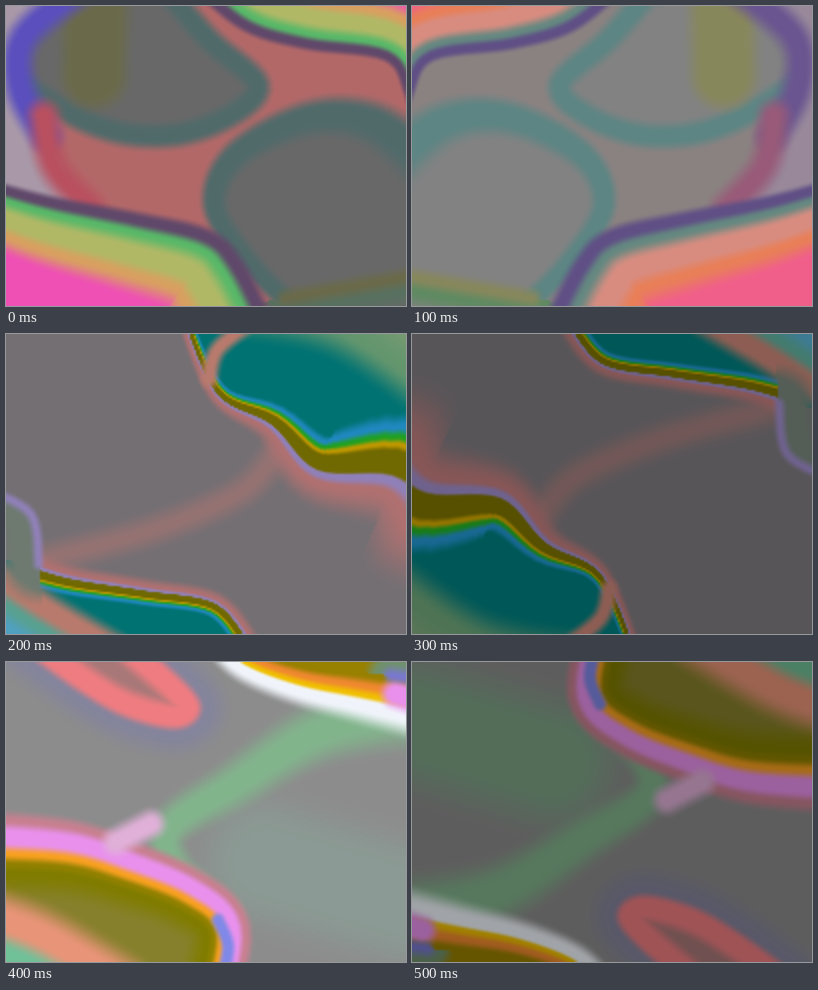
These frames come from a looping animation (400 px wide and 300 px high, 0.6 s). An HTML page with a canvas:

```html
<!DOCTYPE html>
<html lang="en">
<head>
<meta charset="utf-8">
<title>Liquid colour</title>
<style>
html, body { margin: 0; width: 100%; height: 100%; overflow: hidden; background: #686868; }
canvas { display: block; width: 400px; height: 300px; }
</style>
</head>
<body>
<canvas id="stage" width="400" height="300"></canvas>
<script>
const W = 400, H = 300, HOLD = 100;
const GRAIN = 2;   // stage pixels per computed sample
const STEPS = 7;   // straight pieces per curve span

const clear = color => color + '00';
const mix = (a, b, t) => a + (b - a) * t;
const smooth = t => t * t * (3 - 2 * t);

// A fold is a curve through key points and a colour ramp across it.
// Offsets count to the right of travel; spread scales them from start to end.
const fold = (keys, ramp, spread = [1, 1]) => ({ line: curve(keys), ramp, spread });

// A soft band, solid within core and gone at fade
const band = (keys, color, core, fade) => fold(keys, [
  [-fade, clear(color)], [-core, color], [core, color], [fade, clear(color)]
]);

// Catmull-Rom curve as a polyline
function curve(keys) {
  const n = keys.split(' ').map(Number), last = n.length / 2 - 1, line = [];
  const at = (i, axis) => n[2 * Math.max(0, Math.min(last, i)) + axis];
  for (let k = 0; k <= last * STEPS; k++) {
    const i = Math.min(last - 1, Math.floor(k / STEPS)), u = k / STEPS - i;
    line.push([0, 1].map(axis => {
      const [a, b, c, d] = [-1, 0, 1, 2].map(j => at(i + j, axis));
      return b + u / 2 * (c - a + u * (2 * a - 5 * b + 4 * c - d + u * (3 * (b - c) + d - a)));
    }));
  }
  return line;
}

const dusk = {
  base: '#b36868', gray: '#686868', teal: '#506a6a', olive: '#6a6a4a', moss: '#587060',
  haze: '#a898a8', blue: '#5a4fbd', red: '#b8505f', rim: '#60486a',
  green: '#58b868', lime: '#b0b866', amber: '#d8a060', pink: '#ee50b4'
};
const dawn = {
  base: '#8a8281', gray: '#828282', teal: '#5c8583', olive: '#87875c', moss: '#5f8a62',
  haze: '#98889a', blue: '#6a5590', red: '#985a78', rim: '#5f4f85',
  green: '#648880', lime: '#d88c80', amber: '#e87f58', pink: '#f05f8a'
};

function waves(p) {
  const glow = [
    [-8, clear(p.rim)], [-1, p.rim], [2, p.rim], [9, p.green],
    [20, p.lime], [28, p.lime], [38, p.amber], [54, p.pink]
  ];
  return {
    base: p.base,
    folds: [
      fold('160 -20 205 32 254 78 225 112 160 132 80 118 -30 50',
        [[-16, clear(p.teal)], [-2, p.teal], [6, p.teal], [20, p.gray]]),
      fold('430 150 370 108 300 105 225 145 203 200 240 260 290 310',
        [[-20, p.gray], [-8, p.teal], [0, p.teal], [10, clear(p.teal)]], [2.4, 1]),
      band('90 -20 88 70', p.olive, 20, 42),
      fold('280 292 420 268',
        [[-14, clear(p.olive)], [0, p.olive], [14, p.moss], [34, clear(p.moss)]]),
      fold('80 -20 20 30 15 80 40 130',
        [[-24, clear(p.blue)], [-3, p.blue], [6, p.blue], [24, p.haze]]),
      band('38 110 48 160 85 202', p.red, 3, 24),
      fold('-30 175 40 195 130 213 200 230 230 258 262 320', glow, [1, 1.7]),
      fold('410 130 402 85 380 50 300 38 240 20 190 -20', glow, [0.8, 1.2])
    ]
  };
}

function fins() {
  const pink = '#b07070', purple = '#9080b8', olive = '#706800', teal = '#007272';
  const corner = '#64966e', salmon = '#b87a6c', leaf = '#6e7a70', ridge = '#957272';
  const fin = [
    [-42, clear(pink)], [-9, pink], [-2, purple], [1, purple], [4, olive], [19, olive],
    [24, '#c09800'], [29, '#20a020'], [36, '#2088c0'], [48, teal]
  ];
  return {
    base: '#736f73',
    folds: [
      band('270 120 235 158 150 195 40 225', ridge, 0, 24),
      fold('420 175 385 145 310 138 265 92 210 60 175 -20', fin, [2.2, 0.2]),
      fold('240 -5 330 15 430 85', [[-60, '#7a9a72'], [-20, corner], [16, clear(corner)]]),
      band('250 -15 212 15 203 45', salmon, 2, 13),
      fold('33 235 70 245 140 256 210 269 245 310', fin, [0.45, 0.33]),
      fold('-10 235 45 272 110 310',
        [[-18, clear(salmon)], [0, salmon], [10, salmon], [24, '#58a090'], [42, '#50a0c0']]),
      fold('-20 155 25 180 33 230',
        [[-8, clear(purple)], [0, purple], [9, leaf], [20, leaf], [45, clear(leaf)]])
    ]
  };
}

function ribbons({ mist }) {
  const green = '#82b48c', violet = '#84849c', red = '#ee7c80', rose = '#c88090';
  const orchid = '#e890ec', white = '#f0f4fa', salmon = '#e89478', sky = '#7878d0';
  return {
    base: '#8c8c8c',
    folds: [
      band('260 200 400 240', mist, 25, 85),
      fold('390 50 310 72 230 122 165 165 170 205 220 250',
        [[-38, clear(green)], [-7, green], [7, green], [38, clear(green)]], [1.3, 0.6]),
      fold('20 -20 75 20 120 46 168 58 186 46 168 22 125 -15', [
        [-24, '#a87878'], [-10, red], [3, red], [14, violet], [45, clear(violet)]
      ]),
      fold('420 60 350 44 290 30 235 8 205 -20', [
        [-24, clear(white)], [-2, white], [7, white], [13, '#f0c000'],
        [24, '#f08830'], [36, '#988000']
      ], [1.1, 0.6]),
      band('390 32 430 45', orchid, 6, 20),
      fold('430 20 385 14', [[-10, clear(sky)], [0, sky], [14, '#70906c'], [30, clear('#70906c')]]),
      fold('-30 190 60 195 120 212 180 236 215 268 205 330', [
        [-48, clear(rose)], [-34, rose], [-22, orchid], [-11, orchid], [1, '#f8a020'],
        [12, '#908000'], [20, '#807c00'], [55, '#86802c']
      ], [1, 0.7]),
      band('110 180 145 162', '#e0b0d8', 4, 20),
      band('212 258 222 285 215 320', '#8088e8', 2, 10),
      fold('-20 245 40 268 120 315',
        [[-30, clear(salmon)], [0, salmon], [14, salmon], [34, '#70c098']])
    ]
  };
}

const day = { mist: '#8b9a94' }, night = { mist: '#7da486' };

// Each pose: scene, horizontal and vertical flip, brightness
const poses = [
  [waves(dusk), 1, 1, 1],
  [waves(dawn), -1, 1, 1],
  [fins(), 1, 1, 1],
  [fins(), -1, -1, 0.77],
  [ribbons(day), 1, 1, 1],
  [ribbons(night), -1, -1, 0.67]
];

function rgba(hex) {
  const part = i => parseInt(hex.slice(i, i + 2), 16);
  return [part(1), part(3), part(5), hex.length > 7 ? part(7) / 255 : 1];
}

// Signed offset from the fold's curve, with spread taken out
function offset({ line, spread }, x, y) {
  let best = Infinity, side = 1, place = 0;
  for (let i = 0; i < line.length - 1; i++) {
    const [ax, ay] = line[i], dx = line[i + 1][0] - ax, dy = line[i + 1][1] - ay;
    const px = x - ax, py = y - ay;
    const u = Math.max(0, Math.min(1, (px * dx + py * dy) / (dx * dx + dy * dy)));
    const dist = (px - u * dx) ** 2 + (py - u * dy) ** 2;
    if (dist < best) {
      best = dist;
      side = dx * py - dy * px < 0 ? -1 : 1;
      place = (i + u) / (line.length - 1);
    }
  }
  return side * Math.sqrt(best) / mix(spread[1], spread[0], (1 - place) ** 2);
}

function shade(stops, d) {
  const i = stops.findIndex(stop => stop[0] > d);
  if (i === 0) return stops[0][1];
  if (i < 0) return stops[stops.length - 1][1];
  const [d0, c0] = stops[i - 1], [d1, c1] = stops[i];
  const t = smooth((d - d0) / (d1 - d0));
  return c0.map((v, k) => mix(v, c1[k], t));
}

function makeCanvas(w, h) {
  const c = document.createElement('canvas');
  c.width = w;
  c.height = h;
  return c;
}

function paint({ base, folds }) {
  const w = W / GRAIN, h = H / GRAIN;
  const c = makeCanvas(w, h), g = c.getContext('2d');
  const image = g.createImageData(w, h), ground = rgba(base);
  const ramps = folds.map(f => f.ramp.map(([d, color]) => [d, rgba(color)]));
  for (let y = 0; y < h; y++) {
    for (let x = 0; x < w; x++) {
      const color = [ground[0], ground[1], ground[2], 255];
      folds.forEach((f, i) => {
        const top = shade(ramps[i], offset(f, (x + 0.5) * GRAIN, (y + 0.5) * GRAIN));
        for (let k = 0; k < 3; k++) color[k] = mix(color[k], top[k], top[3]);
      });
      image.data.set(color, 4 * (y * w + x));
    }
  }
  g.putImageData(image, 0, 0);
  return c;
}

function render([scene, sx, sy, light]) {
  const c = makeCanvas(W, H), g = c.getContext('2d');
  g.translate(W / 2, H / 2);
  g.scale(sx, sy);
  g.imageSmoothingQuality = 'high';
  if (light < 1) g.filter = `brightness(${light})`;
  g.drawImage(paint(scene), -W / 2, -H / 2, W, H);
  return c;
}

const pictures = poses.map(render);
const stage = document.getElementById('stage').getContext('2d');

function draw(time) {
  stage.drawImage(pictures[Math.floor(time / HOLD) % pictures.length], 0, 0);
}

function tick(time) {
  draw(time);
  requestAnimationFrame(tick);
}

draw(0);
requestAnimationFrame(tick);
</script>
</body>
</html>
```
